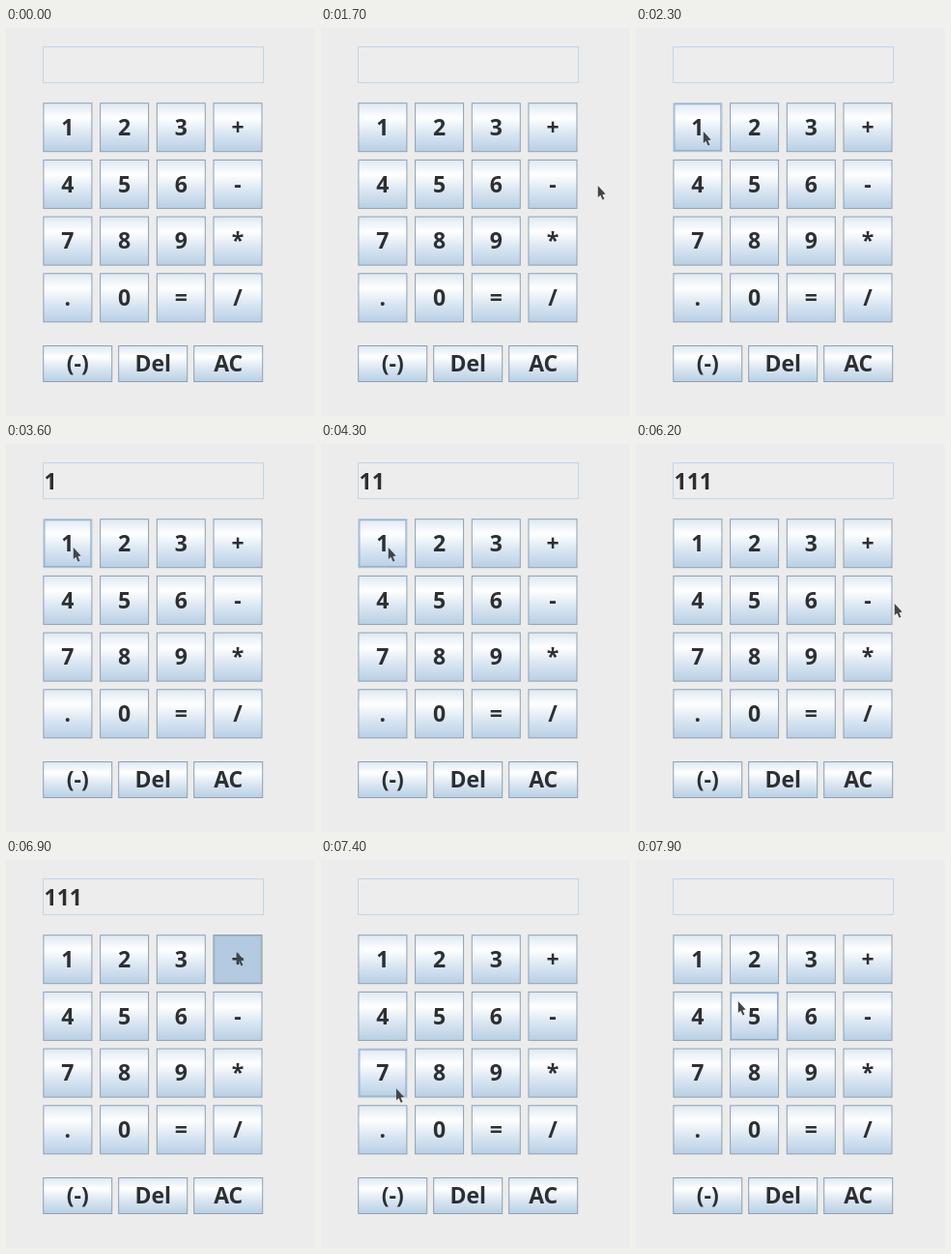
Write an HTML page that moves like this. It is 320 px wide and 401 px high and loops after 8000 ms.

```html
<!DOCTYPE html>
<html lang="en">
<head>
<meta charset="utf-8">
<title>Calculator</title>
<style>
  html, body { margin: 0; width: 100%; height: 100%; overflow: hidden; background: #ececec; }
  svg { display: block; width: 320px; height: 401px; }
  text { font: 700 23px "Open Sans", "Noto Sans", sans-serif; fill: #2d2f31; }
  .key text { text-anchor: middle; }
  .face { fill: url(#ocean); stroke: #8ea0b2; }
  .rim { fill: none; stroke: none; }
  .hover .face { stroke: #b0c4d8; }
  .hover .rim { stroke: #8ba8c8; }
  .pressed .face { fill: #b3cae0; stroke: #7d90a3; }
  .pressed .rim { stroke: #a3b8cd; }
</style>
</head>
<body>
<svg viewBox="0 0 320 401">
  <defs>
    <linearGradient id="ocean" x1="0" y1="0" x2="0" y2="1">
      <stop offset="0" stop-color="#dde8f3"/>
      <stop offset=".3" stop-color="#fff"/>
      <stop offset=".6" stop-color="#dde8f3"/>
      <stop offset="1" stop-color="#b8cfe5"/>
    </linearGradient>
  </defs>
  <rect width="320" height="401" fill="#ececec"/>
  <rect x="38.5" y="19.5" width="228" height="37" fill="#ededed" stroke="#c3d5e5"/>
  <text id="display" x="39.5" y="47"></text>
  <g id="keys"></g>
  <path id="cursor" d="M.8 1V13L3.4 10.8L5.6 15.6L7.4 14.8L5.4 10.2L8.6 9.6Z" fill="#414549"/>
</svg>
<script>
  const LOOP = 8000, STEP = 100;
  const KEY = 51, PITCH = 58.7;

  // Mouse strokes: a curve from one point to another, bent by a control point.
  const STROKES = [
    { start: 1700, end: 2300, from: [286, 162], bend: [215, 80], to: [69, 106] },
    { start: 5400, end: 6200, from: [77, 115], bend: [190, 440], to: [267, 164] },
    { start: 6200, end: 6800, from: [267, 164], bend: [270, 115], to: [238, 94] },
    { start: 7200, end: 7900, from: [238, 94], bend: [-20, 352], to: [105, 145] }
  ];
  const CLICKS = [
    { down: 3200, up: 3600, shows: "1" },
    { down: 4200, up: 4300, shows: "11" },
    { down: 5000, up: 5100, shows: "111" },
    { down: 6900, up: 7100, shows: "" }
  ];

  const keyLayer = document.getElementById("keys");
  const display = document.getElementById("display");
  const cursor = document.getElementById("cursor");

  function svg(tag, attrs, parent) {
    const node = document.createElementNS("http://www.w3.org/2000/svg", tag);
    for (const name in attrs) node.setAttribute(name, attrs[name]);
    return parent.appendChild(node);
  }

  function addKey(label, x, y, w, h) {
    const node = svg("g", { class: "key" }, keyLayer);
    const box = (cls, inset) => svg("rect", {
      class: cls, x: x + inset, y: y + inset, width: w - 2 * inset, height: h - 2 * inset
    }, node);
    box("face", .5);
    box("rim", 1.5);
    svg("text", { x: x + w / 2, y: y + h / 2 + 8.3 }, node).textContent = label;
    return { node, x, y, w, h };
  }

  const keys = [
    ...[..."123+456-789*.0=/"].map((label, i) =>
      addKey(label, 38.4 + PITCH * (i % 4), 77.2 + PITCH * (i >> 2), KEY, KEY)),
    ...["(-)", "Del", "AC"].map((label, i) => addKey(label, 38.2 + 78 * i, 328, 72, 38))
  ];

  const easeOut = p => 1 - (1 - p) ** 2;

  function pointer(t) {
    const stroke = STROKES.findLast(s => s.start <= t);
    if (!stroke) return null;
    const { start, end, from, bend, to } = stroke;
    const u = easeOut(Math.min(1, (t - start) / (end - start)));
    return from.map((a, i) =>
      a * (1 - u) ** 2 + 2 * bend[i] * u * (1 - u) + to[i] * u ** 2);
  }

  function draw(t) {
    const at = pointer(t);
    const pressing = CLICKS.some(c => t >= c.down && t < c.up);
    const inside = k => at && at[0] >= k.x && at[0] < k.x + k.w && at[1] >= k.y && at[1] < k.y + k.h;

    display.textContent = CLICKS.findLast(c => c.up <= t)?.shows ?? "";
    cursor.setAttribute("visibility", at ? "visible" : "hidden");
    if (at) cursor.setAttribute("transform", `translate(${at})`);
    for (const key of keys) {
      const state = inside(key) ? (pressing ? " pressed" : " hover") : "";
      key.node.setAttribute("class", "key" + state);
    }
  }

  const begin = performance.now();
  function tick() {
    const t = (performance.now() - begin) % LOOP;
    draw(Math.floor(t / STEP) * STEP);
    requestAnimationFrame(tick);
  }
  tick();
</script>
</body>
</html>
```
